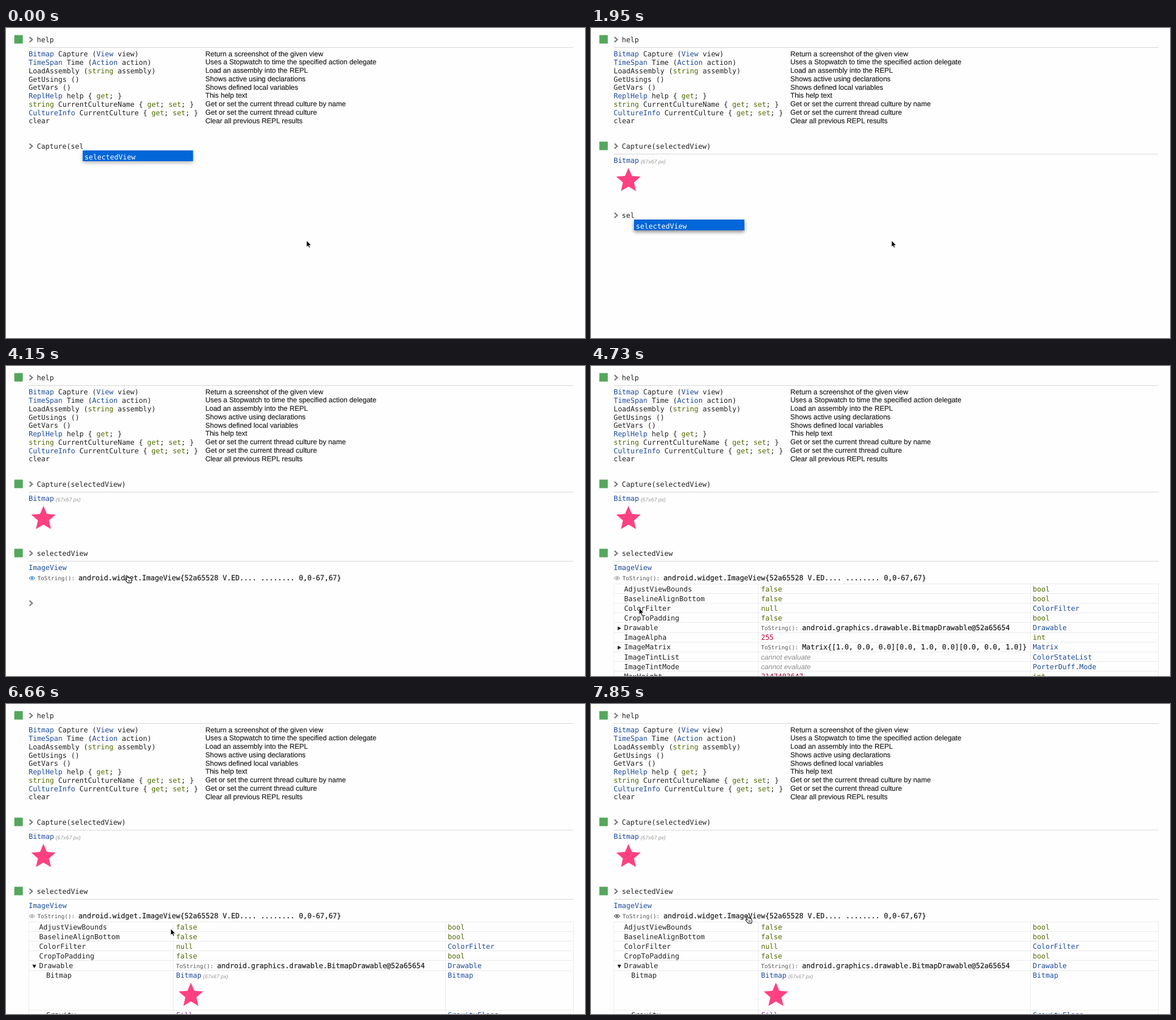
Recreate the animation shown at these times as an HTML page. Size 1023 by 547 pixels, loop 8 s.

```html
<!DOCTYPE html>
<html lang="en">
<head>
<meta charset="utf-8">
<title>REPL session</title>
<style>
html, body { margin: 0; width: 100%; height: 100%; overflow: hidden; background: #fefefe; }
svg { display: block; width: 1023px; height: 547px; }
text { font: 12.45px "DejaVu Sans Mono", monospace; fill: #222; white-space: pre; text-rendering: geometricPrecision; }
.sans { font-family: "Liberation Sans", sans-serif; stroke: #222; stroke-width: .2px; }
.type { fill: #1d4b99; }
.key { fill: #4e6b00; }
.num { fill: #b8002a; }
.enum { fill: #8540a5; }
.none { font-family: "Liberation Sans", sans-serif; font-style: italic; fill: #8c8c8c; }
.size { font: italic 9.4px "Liberation Sans", sans-serif; fill: #999; }
.label { font-size: 10px; fill: #555; }
.strong { stroke: #222; stroke-width: .25px; }
.pick { fill: #fff; }
.popup { fill: #0066d9; }
</style>
</head>
<body>
<svg id="stage" viewBox="0 0 1023 547"></svg>
<script>
const stage = document.getElementById('stage');
const LOOP = 8000, ADV = 7.495, PITCH = 17.1;

const text = (x, y, s, cls = '') => `<text x="${x}" y="${y}" class="${cls}">${s}</text>`;
const rect = (x, y, w, h, fill) => `<rect x="${x}" y="${y}" width="${w}" height="${h}" fill="${fill}"/>`;
const path = (x, y, d, attrs, scale = 1) =>
  `<path transform="translate(${x} ${y}) scale(${scale})" d="${d}" ${attrs}/>`;

const highlight = s => s
  .replace(/\b(Bitmap|View|TimeSpan|Action|ReplHelp|CultureInfo)\b/g, '<tspan class="type">$1</tspan>')
  .replace(/\b(string|get|set)\b/g, '<tspan class="key">$1</tspan>');

const HELP = [
  ['Bitmap Capture (View view)', 'Return a screenshot of the given view'],
  ['TimeSpan Time (Action action)', 'Uses a Stopwatch to time the specified action delegate'],
  ['LoadAssembly (string assembly)', 'Load an assembly into the REPL'],
  ['GetUsings ()', 'Shows active using declarations'],
  ['GetVars ()', 'Shows defined local variables'],
  ['ReplHelp help { get; }', 'This help text'],
  ['string CurrentCultureName { get; set; }', 'Get or set the current thread culture by name'],
  ['CultureInfo CurrentCulture { get; set; }', 'Get or set the current thread culture'],
  ['clear', 'Clear all previous REPL results']
];

// name, value, value class, type, type class
const ROWS = [
  ['AdjustViewBounds', 'false', 'key', 'bool', 'key'],
  ['BaselineAlignBottom', 'false', 'key', 'bool', 'key'],
  ['ColorFilter', 'null', 'key', 'ColorFilter', 'type'],
  ['CropToPadding', 'false', 'key', 'bool', 'key'],
  ['Drawable', 'android.graphics.drawable.BitmapDrawable@52a65654', 'object', 'Drawable', 'type'],
  ['ImageAlpha', '255', 'num', 'int', 'key'],
  ['ImageMatrix', 'Matrix{[1.0, 0.0, 0.0][0.0, 1.0, 0.0][0.0, 0.0, 1.0]}', 'object', 'Matrix', 'type'],
  ['ImageTintList', 'cannot evaluate', 'none', 'ColorStateList', 'type'],
  ['ImageTintMode', 'cannot evaluate', 'none', 'PorterDuff.Mode', 'type'],
  ['MaxHeight', '2147483647', 'num', 'int', 'key']
];

const CURSORS = {
  arrow: ['M0 0V11.6L2.7 9.2 4.5 13.2 6.4 12.3 4.7 8.4H8.3Z', 'fill="#000" stroke="#fff" stroke-width=".9"'],
  beam: ['M-2.5 -6Q0 -6 0 -4.5V4.5Q0 6 -2.5 6M2.5 -6Q0 -6 0 -4.5M0 4.5Q0 6 2.5 6M-1.5 1.5H1.5',
    'fill="none" stroke="#333" stroke-width=".9"'],
  hand: ['M-3.6 -5.5Q-2.4 -7-1.4 -5.3L-.2 -2.3Q1 -3.3 1.8 -2Q3-2.8 3.8-1.5Q5.2-2 5.6-.4L6.4 3.2 5.8 6.6H-.4L-4.6 2Q-5.6.2-3.8.2L-2 1.4Z M1 2V4.6M3 2V4.6',
    'fill="#fff" stroke="#111" stroke-width="1.1" stroke-linejoin="round"']
};

// time, x, y, shape
const MOUSE = [
  [0, 531, 375, 'arrow'], [2530, 541, 361, 'arrow'], [2680, 558, 332, 'beam'], [2980, 561.5, 330, 'beam'],
  [3130, 547, 334, 'beam'], [3280, 480, 348, 'beam'], [3420, 388, 362, 'beam'], [3570, 300, 372, 'hand'],
  [3720, 242, 376, 'hand'], [3860, 218, 377, 'hand'], [4150, 215.5, 376, 'hand'], [4590, 168, 391, 'arrow'],
  [4730, 85, 427, 'arrow'], [4880, 66, 443, 'arrow'], [5030, 55, 457, 'arrow'], [5170, 52, 465, 'hand'],
  [5320, 51, 466, 'hand'], [5470, 51, 467, 'hand'], [6060, 66, 462, 'arrow'], [6210, 124, 446, 'arrow'],
  [6360, 208, 422, 'arrow'], [6510, 268, 402, 'arrow'], [6660, 291, 396.5, 'arrow'],
  [6810, 286, 388, 'arrow'], [6960, 280, 381, 'hand'], [7110, 278, 380, 'hand']
];

const star = (x, y) => path(x, y,
  'M12 17.27 18.18 21 16.54 13.97 22 9.24 14.81 8.63 12 2 9.19 8.63 2 9.24 7.46 13.97 5.82 21Z', 'fill="#ff4081"', 2.15);
const bitmap = (x, y) =>
  text(x, y, 'Bitmap', 'type') + text(x + 47.8, y + .4, '(67x67 px)', 'size') + star(x + .5, y + 4.2);
const caret = (x, y) => rect(x, y - 8.5, 1.2, 17, '#777');

function prompt(y, s, done) {
  let out = path(41.5, y, 'M0 -4.4 4.9 0 0 4.4', 'fill="none" stroke="#7b7b7b" stroke-width="2.3"') +
    text(54.6, y + 4.1, s);
  if (done) out += rect(14.7, y - 8, 15, 15, '#55a75d') + rect(40, y + 13.5, 962.5, 1, '#d6d6d6');
  return out;
}

function popup(x, y, strength) {
  const shadow = `drop-shadow(0 3px 3px rgba(0,0,0,${strength}))`;
  return `<rect class="popup" x="${x}" y="${y}" width="195" height="19" style="filter:${shadow}"/>` +
    text(x + 3.3, y + 15.5, 'selectedView', 'pick');
}

const labelled = (x, y, s) => text(x, y, 'ToString():', 'label') + text(x + 72.7, y, s, 'strong');

function eye(color) {
  return path(46, 374.3, 'M-5 0Q0 -6 5 0Q0 6 -5 0Z', `fill="none" stroke="${color}" stroke-width="1.3"`) +
    `<circle cx="46" cy="374.3" r="2" fill="${color}"/>`;
}

function row([name, value, vClass, type, tClass], y, indent = 0) {
  return text(58.6 + indent, y, name) + text(780.5, y, type, tClass) +
    (vClass == 'object' ? labelled(300.4, y, value) : text(300.4, y, value, vClass));
}

function table(expanded) {
  const line = '#ebebeb', tri = (y, open) =>
    path(50, y, open ? 'M-3.4 -2.8H3.4L0 3.6Z' : 'M-2.8 -3.4V3.4L3.4 0Z', 'fill="#222"');
  const base = i => 397.8 + i * PITCH;
  let out = rect(40, 384, 1, 163, line) + rect(295, 384, 1, 163, line) +
    rect(776, 384, 1, 163, line) + rect(1002, 384, 1, 163, line);
  ROWS.slice(0, expanded ? 5 : 10).forEach((r, i) => {
    out += rect(40, Math.round(384 + i * PITCH), 963, 1, line) + row(r, base(i));
  });
  out += tri(462.8, expanded);
  if (!expanded) return out + tri(497, false);
  return out + rect(40, 470, 963, 1, line) + rect(40, 540, 963, 1, line) +
    text(71, base(5), 'Bitmap') + bitmap(300.4, base(5)) + text(780.5, base(5), 'Bitmap', 'type') +
    row(['Gravity', 'Fill', 'enum', 'GravityFlags', 'type'], 552.6, 12.4);
}

const header = prompt(20.5, 'help', true) + HELP.map(([code, info], i) =>
  text(39.9, 50.4 + i * 14.75, highlight(code)) + text(352.3, 49.6 + i * 14.75, info, 'sans')).join('');

function firstCall(t) {
  if (t >= 770) return prompt(208.5, 'Capture(selectedView)', true) + bitmap(39.9, 238.3);
  if (t < 150) return prompt(208.5, 'Capture(sel') + popup(135.5, 216, .28);
  const s = 'Capture(selectedView' + (t < 480 ? '' : ')');
  return prompt(208.5, s) + caret(54.4 + s.length * ADV, 208.5);
}

function secondCall(t) {
  if (t < 770) return '';
  if (t < 2390) {
    const typed = t < 1220 ? 0 : t < 1365 ? 1 : t < 1510 ? 2 : 3;
    const s = 'selectedView'.slice(0, t < 2250 ? typed : 12);
    const suggest = t >= 1810 && t < 2250;
    return prompt(330.5, s) + (suggest ? popup(76, 338, t < 1950 ? .25 : .45) : caret(54.4 + s.length * ADV, 330.5));
  }
  const open = t >= 4440 && t < 7400 || t >= 7850;
  const hover = t >= 3570 && t < 4590 || t >= 6960;
  let out = prompt(330.5, 'selectedView', true) + text(39.9, 360.3, 'ImageView', 'type') +
    eye(!hover ? '#b0b0b0' : open ? '#666' : '#4f9bd5') +
    labelled(55.4, 378.3, 'android.widget.ImageView{52a65528 V.ED.... ........ 0,0-67,67}');
  if (open) return out + table(t >= 5760);
  return out + prompt(418.5, '') + (t < 3420 ? caret(54.4, 418.5) : '');
}

function mouse(t) {
  const [, x, y, shape] = MOUSE.findLast(m => m[0] <= t);
  return path(x, y, ...CURSORS[shape]);
}

let shown = '';
function frame(now) {
  const t = now % LOOP;
  const picture = header + firstCall(t) + secondCall(t) + mouse(t);
  if (picture != shown) stage.innerHTML = shown = picture;
  requestAnimationFrame(frame);
}
frame(0);
</script>
</body>
</html>
```
